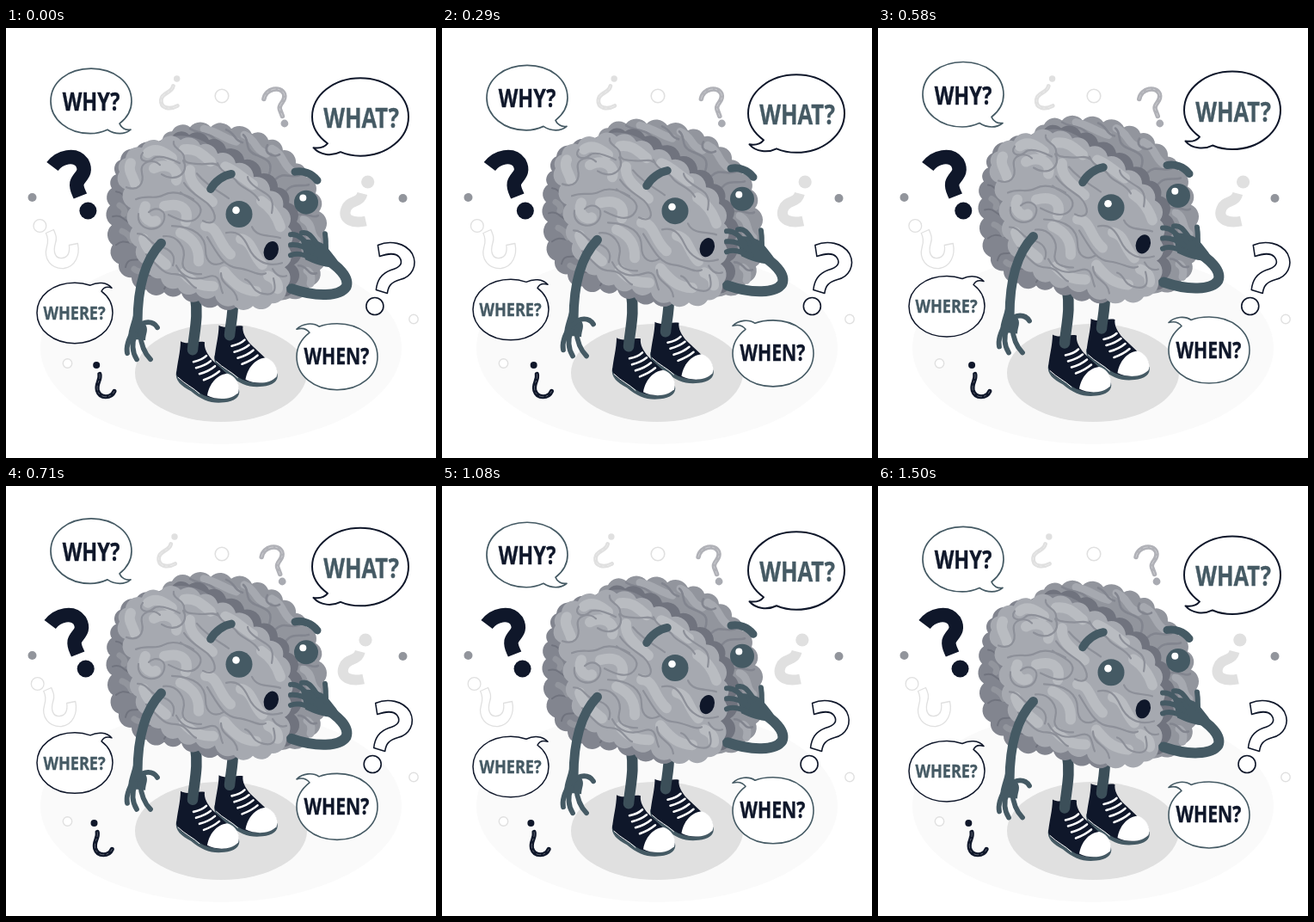
An HTML page for the animation above (1540 ms loop, 500 by 500 pixels).

```html
<!DOCTYPE html>
<html lang="en">
<head>
<meta charset="utf-8">
<title>Questions</title>
<style>
html, body { margin: 0; width: 100%; height: 100%; overflow: hidden; background: #fff; }
svg { display: block; width: 100%; height: 100%; }
text { font: 700 10px "Open Sans", "Noto Sans", sans-serif; text-anchor: middle; }
.line { fill: none; stroke-linecap: round; stroke-linejoin: round; }
</style>
</head>
<body>
<svg id="stage" viewBox="0 0 500 500"></svg>
<script>
const NAVY = '#0f172a', SLATE = '#455a64', DEEP = '#3c4f59', PALE = '#e0e0e0';
const FRONT = '#a6a9b0', LIGHT = '#b9bcc1', GROOVE = '#8d9099';
const BACK = '#92959d', SHADE = '#82858f', GAP = '#70737e';

const line = (d, color, w, more = '') =>
  `<path class="line" d="${d}" stroke="${color}" stroke-width="${w}" ${more}/>`;
const lines = (list, color, w) => line(list.join(''), color, w);
const fill = (d, color) => `<path d="${d}" fill="${color}"/>`;
const dot = (x, y, r, color) => `<circle cx="${x}" cy="${y}" r="${r}" fill="${color}"/>`;
const ring = (x, y, r, color, w) =>
  `<circle cx="${x}" cy="${y}" r="${r}" fill="#fff" stroke="${color}" stroke-width="${w}"/>`;
const oval = (x, y, rx, ry, color, more = '') =>
  `<ellipse cx="${x}" cy="${y}" rx="${rx}" ry="${ry}" fill="${color}" ${more}/>`;
const shape = (d, color, w) =>
  `<path d="${d}" fill="#fff" stroke="${color}" stroke-width="${w}" stroke-linejoin="round"/>`;

// Closed outline made of outward bumps through the given points
function scallop(text) {
  const pts = text.split(' ').map(s => s.split(',').map(Number));
  let d = `M${pts[0]}`;
  pts.forEach((a, i) => {
    const b = pts[(i + 1) % pts.length];
    const r = Math.hypot(b[0] - a[0], b[1] - a[1]) * 0.64;
    d += `A${r} ${r} 0 0 1 ${b}`;
  });
  return d + 'Z';
}

function label(word, x, y, size, color) {
  return `<text transform="translate(${x} ${y}) scale(.815 1)" style="font-size:${size}px" fill="${color}" stroke="${color}" stroke-width=".4">${word}</text>`;
}

// A rough, hand-hatched stroke
const sketch = (d, color, w) =>
  line(d, color, w) + line(d, '#fff', 0.6, 'stroke-dasharray="5 3 2 4" opacity=".55"');

const scene =
  oval(250, 372, 210, 112, '#fafafa') +
  oval(250, 401, 100, 57, PALE) +
  ring(251, 79, 7.8, PALE, 1.6) +
  dot(30.5, 197, 5, '#92959c') + dot(461.5, 198, 5, '#92959c') +
  ring(474, 338.5, 5.2, PALE, 1.4) + ring(71.5, 390, 5.2, PALE, 1.4);

const marks =
  line('M53.5 160.5C62 149 80 145 88 156C95 169 84 172 82 180C81 186 84 190 86 195', NAVY, 16.5, 'style="stroke-linecap:butt"') +
  dot(95, 212, 10, NAVY) +
  line('M414 192C411 204 399 199 395 210C390 223 404 227 418 224', PALE, 12, 'style="stroke-linecap:butt"') +
  dot(420.3, 178.5, 7.6, PALE) +
  shape('M432 252C446 246 464 249 472 262C479 276 471 289 458 292C447 295 444 300 443 308L430 304C431 293 436 285 447 281C458 278 462 273 457 266C452 260 443 262 434 265Z', NAVY, 1.6) +
  ring(428.5, 323, 10, NAVY, 1.6) +
  shape('M46 238L55 234C58 241 59 244 57 250C54 260 57 268 65 267C72 266 74 260 73 252L83 250C86 264 80 277 67 279C52 280 43 268 47 254C49 248 49 244 46 238Z', PALE, 1.3) +
  ring(39, 229.5, 7.4, PALE, 1.3) +
  sketch('M194 67C192 76 181 74 180 83C179 93 190 95 199 90', PALE, 4.8) +
  dot(198.3, 58.5, 3.7, PALE) +
  sketch('M299.5 82C302 69 319 67 323 76C326 85 316 87 318 94L321 102', '#b0b1b7', 5.5) +
  dot(323.5, 110.5, 4.4, '#a9abb2') +
  sketch('M108.5 402C110 409 104 413 106 421C109 431 122 430 125.5 422', NAVY, 5.2) +
  dot(104.8, 391.5, 4, NAVY);

const bubbles =
  shape('M132 111C134 116 139 119 145 118C138 124 127 124 118 118C109 122 103 122.5 98 122.5C72 122.5 52 106 52 85C52 63 72 47 99 47C126 47 146 63 146 85C146 95 141 104 132 111Z', SLATE, 1.7) +
  label('WHY?', 99, 96, 28.7, NAVY) +
  shape('M374 134C370 139 364 140 357.5 139C365 148 379 149 389 144C396 147 404 148.5 412 148.5C443 148.5 468 128 468 103C468 78 443 58 412 58C381 58 356 78 356 103C356 115 363 126 374 134Z', NAVY, 2) +
  label('WHAT?', 413, 116, 31.4, SLATE) +
  shape('M111 306C113 302 117 300 123 302C117 295 106 295 98 299C92 297 86 296 80 296C55 296 36 311 36 331C36 351 55 366.5 80 366.5C104 366.5 124 351 124 331C124 321 119 312 111 306Z', NAVY, 1.5) +
  label('WHERE?', 79.5, 338.7, 22.2, SLATE) +
  shape('M353 354C350 350 345 348 338 350C345 343 357 342 364 347C371 344 378 343.5 385 343.5C412 343.5 432 360 432 382C432 404 412 420.5 385 420.5C358 420.5 338 404 338 382C338 371 344 361 353 354Z', SLATE, 1.6) +
  label('WHEN?', 384.5, 391, 26, NAVY);

const shoe =
  fill('M198 399C196 410 204 416 215 422C228 433 240 437 254 435C265 434 273 429 271 420Z', SLATE) +
  fill('M203 364C211 369 222 363 231 365C230 372 234 379 240 386L257 402C267 405 272 414 270 424C262 433 238 433 225 424C212 415 200 411 198 402C199 390 203 376 203 364Z', NAVY) +
  fill('M234 427C236 414 245 403 257 401.5C267 404 273 415 270 424C262 432 246 433 234 427Z', '#fff') +
  lines(['M218 388Q228 386 233 381', 'M221 395Q232 392 238 387', 'M225 402Q236 399 243 393',
    'M230 409Q241 405 248 399'], '#fff', 2.6) +
  line('M200 406C208 414 218 418 225 425', '#fff', 1);

const legs =
  line('M220 312C224 335 219 352 217 374', DEEP, 12.5) +
  line('M264 316C264 335 261 345 260 357', DEEP, 12.5);

const backBrain =
  fill(scallop('182,133 193,120 214,115 238,115 262,117 286,123 305,130 322,142 337,157 349,173 360,192 364,213 370,236 368,259 365,281 353,300 330,314 300,300 200,200'), BACK) +
  lines(['M230 117C248 121 253 128 268 132', 'M277 124C292 130 288 141 303 146', 'M309 140C324 147 321 160 334 167',
    'M346 222C359 229 352 240 362 247', 'M350 282Q357 286 354 297'], FRONT, 9) +
  lines(['M214 117C225 124 238 120 246 133S267 139 274 150', 'M256 118C268 123 264 130 275 133',
    'M276 124C284 130 276 141 290 147S311 155 306 170', 'M304 136C298 145 312 151 318 147',
    'M313 176C323 166 329 175 341 171', 'M325 190C333 179 344 185 352 182', 'M338 217C352 214 357 222 363 218',
    'M341 232C350 239 345 248 355 255S366 257 367 251', 'M340 276C352 276 350 288 361 285'], SHADE, 2.6) +
  fill(scallop('186,140 193,126 213,124 236,130 256,141 277,153 297,169 316,185 329,203 338,225 340,250 335,275 336,298 322,312 250,250'), GAP);

const sideBrain =
  fill(scallop('128,170 133,153 151,141 172,135 255,160 292,310 270,322 246,322 224,317 204,308 184,307 163,304 146,290 131,274 124,252 123,229 121,206 123,186'), SHADE) +
  lines(['M128 190C140 191 136 203 148 207', 'M124 219C136 215 138 227 148 227', 'M128 252C139 243 144 254 153 248',
    'M139 278C142 263 154 274 160 266', 'M159 296C160 282 176 291 180 283', 'M184 303Q190 291 205 300'], GAP, 2) +
  lines(['M132 206Q140 211 137 216', 'M135 236Q143 239 146 247', 'M149 280Q155 285 168 283'], BACK, 7);

const frontBrain =
  fill(scallop('132,167 139,151 158,139 179,132 203,130 226,136 246,146 267,157 288,173 307,189 322,208 328,231 328,254 324,278 326,301 309,320 287,323 265,322 243,311 221,307 200,302 180,291 163,275 152,254 147,232 145,209 138,187'), FRONT) +
  lines(['M145 157C141 166 148 172 150 181', 'M165 145C175 137 186 146 193 151', 'M207 141C222 139 229 148 238 155',
    'M172 163C189 155 202 165 198 177', 'M214 165C212 180 226 189 240 202', 'M255 161C265 164 276 175 287 182',
    'M162 207C157 218 166 228 174 224', 'M184 207C204 202 213 211 209 225', 'M160 245C164 261 178 267 186 275',
    'M203 238C216 244 225 253 224 271', 'M232 230C247 230 246 250 261 263', 'M273 245C287 248 286 263 298 275',
    'M207 285C218 298 229 300 241 300', 'M254 283C268 300 276 305 291 306', 'M305 288Q317 293 316 303',
    'M297 201C306 207 315 218 319 231'], LIGHT, 12) +
  lines(['M140 185C154 190 161 181 158 168S171 151 179 159', 'M159 145C152 154 165 158 171 152S190 151 202 157',
    'M195 132C193 140 207 142 207 150S215 157 225 158S240 155 247 160', 'M181 170C198 181 214 167 206 154',
    'M151 199C165 193 172 200 183 194S208 193 218 199', 'M154 216C151 235 177 239 183 225S173 206 166 214',
    'M189 217C199 222 217 231 225 217S207 196 203 191', 'M207 180C219 198 235 199 241 213S237 228 229 224',
    'M222 169C235 185 252 192 259 198', 'M246 157C250 169 262 169 268 178S288 188 294 200',
    'M281 173C282 181 294 187 303 193S310 209 309 215', 'M153 239C166 239 166 251 179 254S198 265 194 276',
    'M183 242C199 240 210 255 206 269S217 286 227 286', 'M193 230C220 231 232 242 232 258S243 278 253 272',
    'M234 243C245 260 252 277 269 279S294 289 302 285', 'M256 238C269 235 276 242 282 255S301 279 321 273',
    'M286 231C292 244 307 240 319 244', 'M163 263C178 277 182 286 196 286S213 299 221 302',
    'M198 276C205 291 220 294 235 289S248 300 252 308', 'M250 285C250 301 267 300 269 316',
    'M278 292C288 295 284 306 300 309S313 299 311 291', 'M310 280Q316 291 326 288'], GROOVE, 2.2);

const face =
  dot(271, 216.3, 15.5, SLATE) + dot(267.5, 211.7, 4.3, '#fff') +
  dot(349, 202.5, 14, SLATE) + dot(345.3, 197.3, 4, '#fff') +
  line('M238 187C243 178 253 171 262 169.5', SLATE, 9.5) +
  line('M336 167C345 165 356 169 362 177', SLATE, 9) +
  oval(308.3, 258.8, 8.4, 11.3, NAVY, 'transform="rotate(18 308.3 258.8)"');

const rightArm =
  line('M332 303C361 313 388 312 395.5 301C400 290 386 276 368 266', SLATE, 12);

const rightHand =
  fill('M343 247C352 244 369 247 376 258C382 266 388 271 387 277C375 280 361 275 348 269Z', SLATE) +
  lines(['M331 240C341 239 347 247 353 255', 'M331 252C341 251 348 255 356 260', 'M331 264C340 260 348 265 360 268',
    'M344 238C353 236 357 245 363 253', 'M371 239C372 247 372 252 372 260'], SLATE, 6);

const leftArm =
  line('M180.5 250C163 268 153 296 153 343', SLATE, 11) +
  fill('M148 334C145 346 141 354 143 361L162 363C162 355 167 350 161 343Z', SLATE) +
  lines(['M149 350C143 360 139 369 141 378', 'M150 356C146 367 147 377 152 385', 'M156 355C157 368 161 378 168 385',
    'M153 348C160 340 171 340 176 348'], SLATE, 5.8);

const stage = document.getElementById('stage');
stage.innerHTML = scene + `<g id="marks">${marks}</g>` +
  `<g id="float">${bubbles}<g transform="translate(44.5 -18.5)">${shoe}</g>${shoe}${legs}` +
  backBrain + rightArm + sideBrain + frontBrain + face + rightHand + leftArm + '</g>';

const floatPart = document.getElementById('float');
const markPart = document.getElementById('marks');
const LOOP = 1540, STEP = 1000 / 24, TURN = 36.5;
const SHAKE = [0, -1, 2, -4, 4, -4, 4, -4, 2, -1, 0];

function draw(ms) {
  const step = Math.min(36, Math.floor((ms % LOOP + 4) / STEP));
  const p = (step + 0.75) / TURN % 1;
  const i = Math.floor(p * 10);
  const x = SHAKE[i] + (SHAKE[i + 1] - SHAKE[i]) * (p * 10 - i) + 0.6;
  const y = -10 * (1 - Math.abs(1 - 2 * p)) + 0.6;
  markPart.setAttribute('transform', `translate(${x.toFixed(2)} 0.5)`);
  floatPart.setAttribute('transform', `translate(0 ${y.toFixed(2)})`);
}

const start = performance.now();
function tick() {
  draw(performance.now() - start);
  requestAnimationFrame(tick);
}
tick();
</script>
</body>
</html>
```
